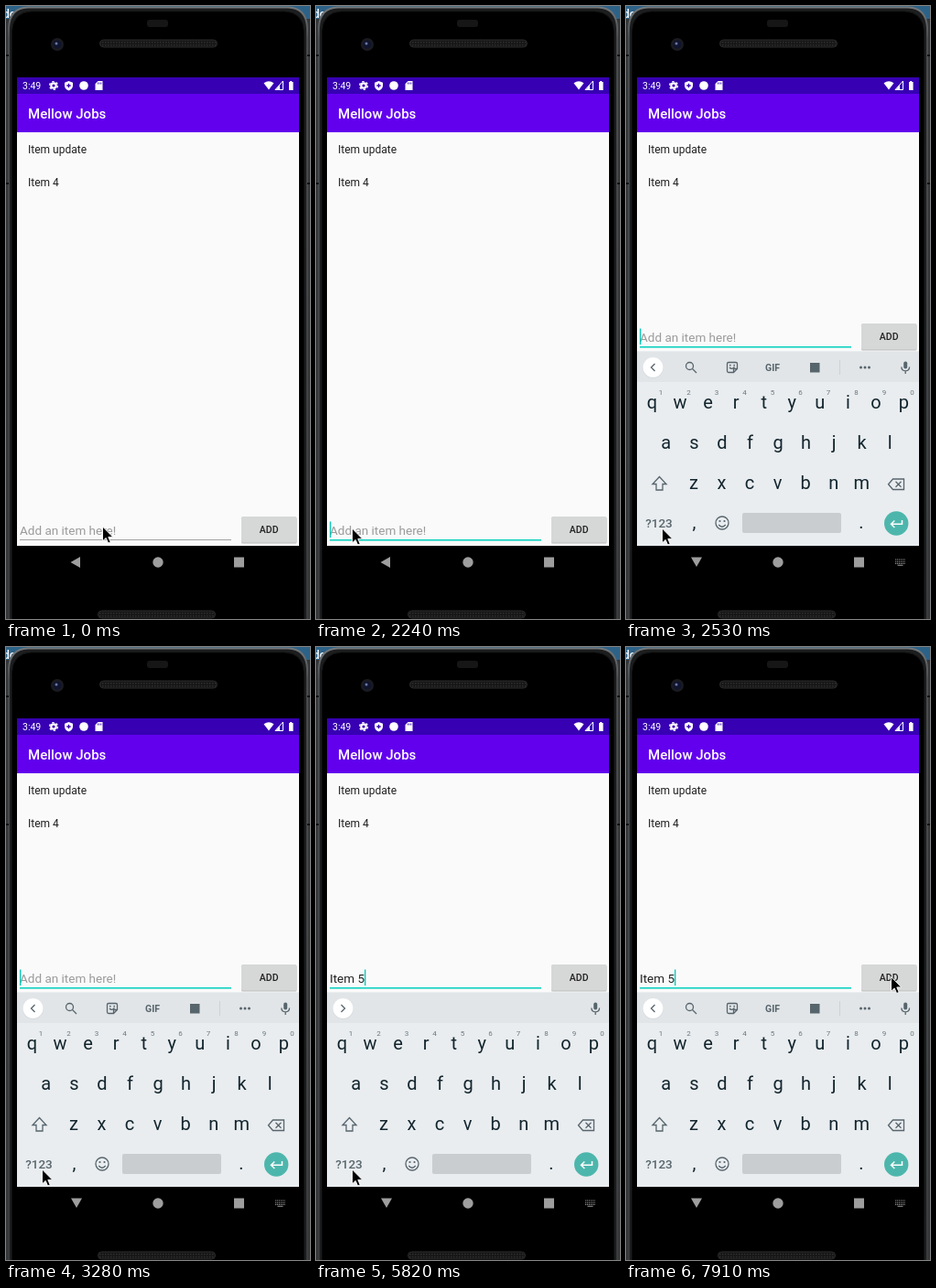
An HTML page that plays this animation: 332x670 px, repeating every 8 s.

```html
<!DOCTYPE html>
<html lang="en">
<head>
<meta charset="utf-8">
<title>Mellow Jobs</title>
<style>
html, body { margin: 0; width: 100%; height: 100%; overflow: hidden; background: #000; }
svg { display: block; width: 332px; height: 670px; }
text { font-family: Roboto, Arial, sans-serif; white-space: pre; }
.mid { text-anchor: middle; }
.field { font-size: 13.5px; }
.key { font-size: 20px; fill: #13252d; }
.hint { font-size: 8px; fill: #6b777d; }
.line { fill: none; stroke: #57656c; stroke-width: 1.3; }
.ink { fill: #57656c; }
</style>
</head>
<body>
<svg viewBox="0 0 332 670">
  <defs>
    <clipPath id="screen"><rect x="12" y="78" width="308" height="548"/></clipPath>
    <pattern id="mesh" width="3" height="3" patternUnits="userSpaceOnUse">
      <rect width="3" height="3" fill="#161616"/><rect width="1.5" height="1.5" fill="#2e2e2e"/>
    </pattern>
    <linearGradient id="rim" x2="0" y2="1">
      <stop offset="0" stop-color="#74787a"/><stop offset=".05" stop-color="#4a4d4f"/>
      <stop offset="1" stop-color="#3a3c3e"/>
    </linearGradient>
  </defs>

  <!-- device -->
  <rect width="332" height="670" fill="#343638"/>
  <rect width="332" height="14" fill="#2d6288"/>
  <text x="-3" y="13" font-size="12" font-weight="500" fill="#fff">do</text>
  <path d="M3 680V24Q4 2 24 1.5H308Q328 2 329 24V680Z" fill="#1c1d1e" stroke="url(#rim)" stroke-width="2"/>
  <path d="M6.5 680V28Q7.5 7 28 6H304Q324.5 7 325.5 28V680Z" fill="#000" stroke="#0e0e0e"/>
  <path d="M0 54H3M0 194H3M329 54H332M329 194H332" stroke="#111" stroke-width="2"/>
  <rect x="154" y="15" width="23" height="8" rx="3" fill="#161616"/>
  <circle cx="56" cy="42" r="7" fill="#1a1b20"/>
  <circle cx="56" cy="42" r="4.5" fill="#10142c"/>
  <circle cx="55" cy="41" r="1.5" fill="#6a76a4"/>
  <rect x="102.5" y="37" width="128" height="8" rx="4" fill="url(#mesh)" stroke="#2a2a2a"/>
  <rect x="100.5" y="661" width="128" height="8" rx="4" fill="url(#mesh)" stroke="#2a2a2a"/>

  <!-- app -->
  <rect x="12" y="78" width="308" height="512" fill="#fafafa"/>
  <rect x="12" y="78" width="308" height="18" fill="#3700b3"/>
  <rect x="12" y="96" width="308" height="42" fill="#6200ee"/>
  <g fill="#fff">
    <text x="18" y="91" font-size="10.5">3:49</text>
    <circle cx="52" cy="87" r="2.7" fill="none" stroke="#fff" stroke-width="2.2"/>
    <circle cx="52" cy="87" r="4.4" fill="none" stroke="#fff" stroke-width="1.4" stroke-dasharray="2.4 2.21"/>
    <path d="M68.5 82L73 83.7V87Q73 90.5 68.5 92.5Q64 90.5 64 87V83.7Z"/>
    <path d="M68.5 84.8V89.2M66.3 87H70.7" stroke="#3700b3" stroke-width="1.3"/>
    <circle cx="85" cy="87" r="4.8"/>
    <path d="M100.5 82H105.5V92H97.5V85Z"/>
    <path d="M100.5 83.5V85.5M102.2 83.5V85.5M103.9 83.5V85.5" stroke="#3700b3" stroke-width=".8"/>
    <path d="M281.5 84.3Q287 80.3 292.5 84.3L287 91.5Z"/>
    <path d="M302.5 82V91.5H294Z" fill="none" stroke="#fff"/>
    <path d="M299 86.5V91.5H294.5Z"/>
    <path d="M309 83H310.2V82H312.2V83H313.6V92H309Z"/>
    <text x="24" y="123" font-size="15" font-weight="500">Mellow Jobs</text>
  </g>
  <g font-size="12" fill="#212121">
    <text x="24" y="160.5">Item update</text>
    <text x="24" y="196.5">Item 4</text>
  </g>

  <g id="bar">
    <rect x="257" y="559" width="60.5" height="28.5" rx="1.5" fill="#bcbcbc"/>
    <rect x="257" y="558" width="60.5" height="28.5" rx="1.5" fill="#d6d7d7"/>
    <text class="mid" x="287.2" y="575.9" font-size="10.5" font-weight="500" fill="#212121">ADD</text>
    <rect id="rule" x="15" width="231"/>
    <text id="prompt" class="field" x="15" y="578" fill="#9b9b9b">Add an item here!</text>
    <text id="typed" class="field" x="15" y="578" fill="#212121"></text>
    <rect id="under" x="15" y="580.3" height="1" fill="#333"/>
    <rect id="caret" y="563.5" width="1.3" height="17.5" fill="#03c9b8"/>
  </g>

  <!-- navigation -->
  <g fill="#9e9e9e">
    <path id="back" d="M-5.5 0L5 -6V6Z"/>
    <circle cx="166" cy="608" r="5.7"/>
    <rect x="249" y="602.5" width="11" height="11"/>
    <g id="ime" stroke="#8c8c8c" stroke-width="1.1">
      <path d="M294 605H305M294 607.2H305M294 609.4H305" stroke-dasharray="1.2 .7"/>
      <path d="M296.5 611.3H302.5"/>
    </g>
  </g>

  <g clip-path="url(#screen)">
    <g id="kb">
      <rect x="12" y="377" width="308" height="213" fill="#e9edf0"/>
      <rect x="12" y="378" width="308" height="33" fill="#e1e5e8"/>
      <circle cx="29.5" cy="395.5" r="11.3" fill="#d2d6d9"/>
      <circle cx="29.5" cy="395" r="11" fill="#fff"/>
      <path id="chev" class="line"/>
      <rect class="ink" x="303.2" y="388.5" width="4" height="8" rx="2"/>
      <path class="line" d="M300.8 394.5Q301 398.8 305.2 398.8T309.6 394.5M305.2 399V402"/>
      <g id="tools">
        <circle class="line" cx="69.5" cy="393.5" r="4"/>
        <path class="line" d="M72.5 396.5L77 401"/>
        <path class="line" d="M112 389.5H120Q121.5 389.5 121.5 391V396.5L117.5 400.5H112Q110.5 400.5 110.5 399V391Q110.5 389.5 112 389.5ZM121 396.5H117.5V400M113 395Q115.5 398 118.5 394.5"/>
        <circle class="ink" cx="113.8" cy="392.7" r=".9"/><circle class="ink" cx="118.2" cy="392.7" r=".9"/>
        <text class="mid ink" x="160" y="398.5" font-size="10.5" font-weight="700">GIF</text>
        <rect class="ink" x="201" y="390" width="10.5" height="10.5"/>
        <path d="M233.5 387V403" stroke="#cdd2d5"/>
        <g class="ink"><circle cx="256.5" cy="395" r="1.5"/><circle cx="261" cy="395" r="1.5"/><circle cx="265.5" cy="395" r="1.5"/></g>
      </g>
      <g id="words" class="field mid" fill="#7b868b">
        <path id="seps" d="M120.5 386V405M210.5 386V405" stroke="#ccd1d4"/>
        <text x="80" y="400"></text>
        <text x="165" y="400" font-weight="700" fill="#111c21"></text>
        <text x="250" y="400"></text>
      </g>
      <g id="keys"></g>
      <path class="line" d="M36.5 514.5L44 522.5H40V529H33V522.5H29Z"/>
      <path class="line" d="M291.5 517H303.5V528.5H291.5L286.5 522.7ZM294.5 519.7L300.5 525.7M300.5 519.7L294.5 525.7"/>
      <text class="mid ink" x="36" y="570" font-size="13.5" font-weight="500">?123</text>
      <text class="mid key" x="74.5" y="571" font-size="18">,</text>
      <circle class="line" cx="105" cy="565" r="7"/>
      <path class="line" d="M101.3 567Q105 571.5 108.7 567"/>
      <circle class="ink" cx="102.5" cy="563" r="1.1"/><circle class="ink" cx="107.5" cy="563" r="1.1"/>
      <rect x="127" y="554" width="108" height="22" rx="2" fill="#c9cdd0"/>
      <text class="mid key" x="257" y="571">.</text>
      <circle cx="295.2" cy="565.5" r="13.2" fill="#4db6ac"/>
      <path d="M301.5 562V566.3H290M293.3 562.5L289.5 566.3L293.3 570" fill="none" stroke="#fff" stroke-width="1.5"/>
    </g>
  </g>

  <path id="mouse" d="M0 0V15.8L3.7 12.4L6.1 18L8.7 16.9L6.3 11.4H11.3Z" fill="#000" stroke="#fff" stroke-width=".9"/>
</svg>
<script>
const LOOP = 8000;
const $ = id => document.getElementById(id);
const show = (el, on) => el.setAttribute('visibility', on ? 'inherit' : 'hidden');
const set = (el, attrs) => { for (const k in attrs) el.setAttribute(k, attrs[k]); };

function label(x, y, cls, text) {
  const el = document.createElementNS('http://www.w3.org/2000/svg', 'text');
  set(el, { x, y, class: 'mid ' + cls });
  el.textContent = text;
  $('keys').append(el);
}
[['qwertyuiop', 28.5, 440], ['asdfghjkl', 43.8, 484], ['zxcvbnm', 74, 528]].forEach(([row, x0, y], r) =>
  [...row].forEach((c, i) => {
    label(x0 + i * 30.55, y, 'key', c);
    if (!r) label(38 + i * 30.5, 425, 'hint', (i + 1) % 10);
  }));

// time, pointer x, pointer y
const path = [
  [0, 105.5, 569], [150, 98, 570], [300, 80, 572], [450, 61, 573], [600, 48, 574], [750, 43, 574],
  [1050, 43, 575], [1190, 44, 576], [1340, 43.2, 575.6], [1490, 41, 575], [1640, 38, 574], [1790, 37.5, 573], [1940, 39.5, 571],
  [6870, 58, 558], [7020, 118, 503], [7170, 198, 432], [7320, 268, 372], [7470, 309, 347],
  [7610, 315, 342], [7760, 301, 352], [7910, 289.5, 360.5]
];
// time, text, suggestions
const typing = [
  [0, '', null],
  [3730, 'I', ["I'm", 'I', 'It']],
  [4030, 'It', ["It's", 'It', 'I']],
  [4170, 'Ite', ['Ite', 'Item', 'It']],
  [4620, 'Item', ['Items', 'Item', 'ITEM']],
  [5520, 'Item ', ['is', 'in', 'for']],
  [5820, 'Item 5', ['', '', '']],
  [5970, 'Item 5', null]
];
// time, caret visible
const blink = [[0, 0], [2240, 1], [2830, 0], [3280, 1], [5070, 0], [5520, 1], [6270, 0], [6870, 1], [7320, 0], [7760, 1]];

const at = (list, t) => list.findLast(s => s[0] <= t);
const wordEls = [...$('words').querySelectorAll('text')];

function draw(t) {
  const focus = t >= 2240, open = t >= 2380, sliding = open && t < 2530;
  const [, mx, my] = at(path, t);
  const [, text, words] = at(typing, t);

  set($('mouse'), { transform: `translate(${mx} ${my})` });
  set($('bar'), { transform: `translate(0 ${open ? -211 : 0})` });
  set($('rule'), focus ? { y: 583, height: 1.5, fill: '#03d0bd' } : { y: 583, height: 1, fill: '#a0a0a0' });

  show($('prompt'), !text);
  $('typed').textContent = text;
  const width = text ? $('typed').getComputedTextLength() : 0;
  set($('under'), { width: text && t < 5520 ? width : 0 });
  set($('caret'), { x: 15 + width });
  show($('caret'), at(blink, t)[1]);

  show($('kb'), open);
  set($('kb'), { transform: `translate(0 ${sliding ? 53 : 0})`, opacity: sliding ? 0.52 : 1 });
  show($('tools'), !words);
  show($('words'), words);
  set($('chev'), { d: words ? 'M27.5 391L31.5 395L27.5 399' : 'M31.5 391L27.5 395L31.5 399' });
  if (words) {
    wordEls.forEach((el, i) => el.textContent = words[i]);
    show($('seps'), words[0]);
  }

  const turn = sliding ? 100 : open ? -90 : 0;
  set($('back'), { transform: `translate(${open ? 77 : 76} ${open ? 607.5 : 608}) rotate(${turn})` });
  show($('ime'), open && !sliding);
}

const start = performance.now();
function tick() {
  draw((performance.now() - start) % LOOP);
  requestAnimationFrame(tick);
}
tick();
</script>
</body>
</html>
```
